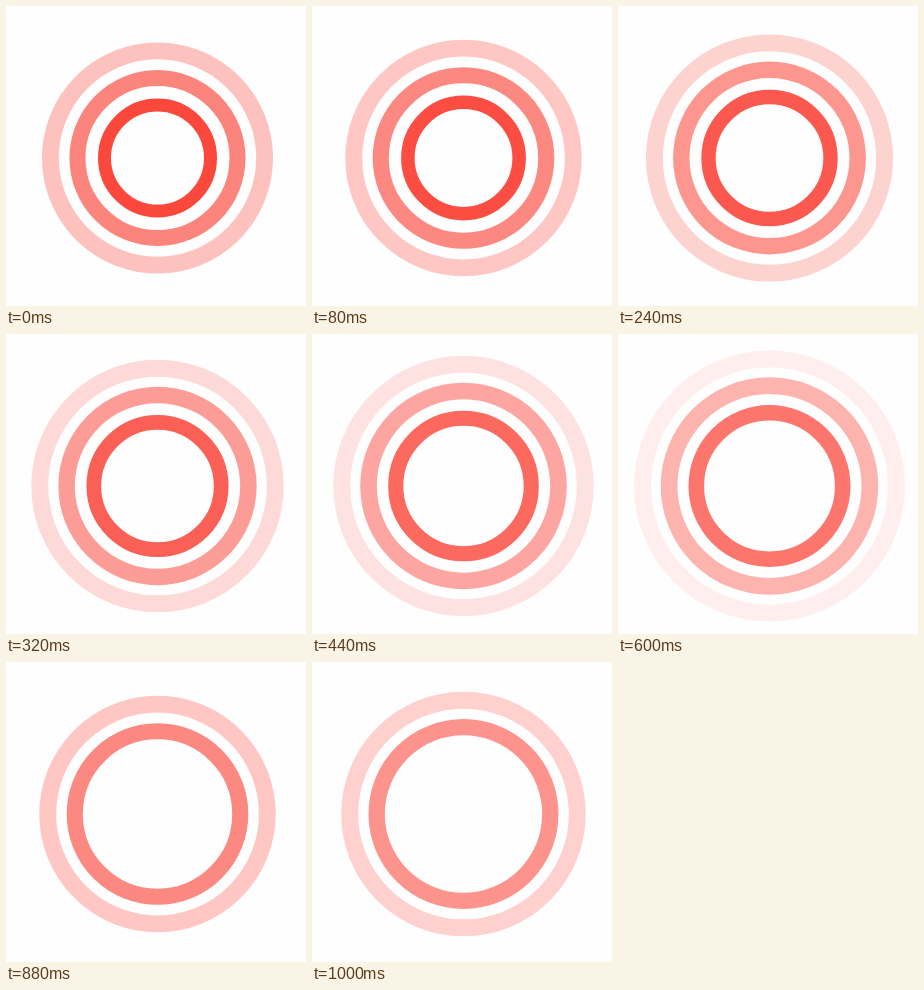
Write an HTML page that moves like this. It is 300 px wide and 300 px high and loops after 1040 ms.

```html
<!DOCTYPE html>
<html lang="en">
<head>
<meta charset="utf-8">
<title>Pulse</title>
<style>
  html, body { margin: 0; width: 100%; height: 100%; overflow: hidden; background: #fefefe; }
  svg { display: block; width: 100%; height: 100%; }
</style>
</head>
<body>
<svg viewBox="0 0 300 300">
  <g fill="none" stroke="#fb483c">
    <circle cx="151.5" cy="152"/>
    <circle cx="151.5" cy="152"/>
    <circle cx="151.5" cy="152"/>
  </g>
</svg>
<script>
  const LOOP = 1040, STEP = 40;
  const SPACING = 800, LIFE = 2400; // ms between rings, ms until a ring has faded
  const rings = document.querySelectorAll("circle");

  const outerRadius = age => 59.5 + 0.0363 * age - 8e-7 * age * age;
  const ringWidth = age => 17.1 - 4.1 * Math.exp(-age / 600);

  function draw(time) {
    rings.forEach((ring, i) => {
      const age = time + i * SPACING;
      const width = ringWidth(age);
      ring.setAttribute("r", outerRadius(age) - width / 2);
      ring.setAttribute("stroke-width", width);
      ring.setAttribute("stroke-opacity", Math.max(0, 1 - age / LIFE));
    });
  }

  const start = performance.now();
  function tick() {
    const time = (performance.now() - start) % LOOP;
    draw(Math.floor(time / STEP) * STEP);
    requestAnimationFrame(tick);
  }
  tick();
</script>
</body>
</html>
```
